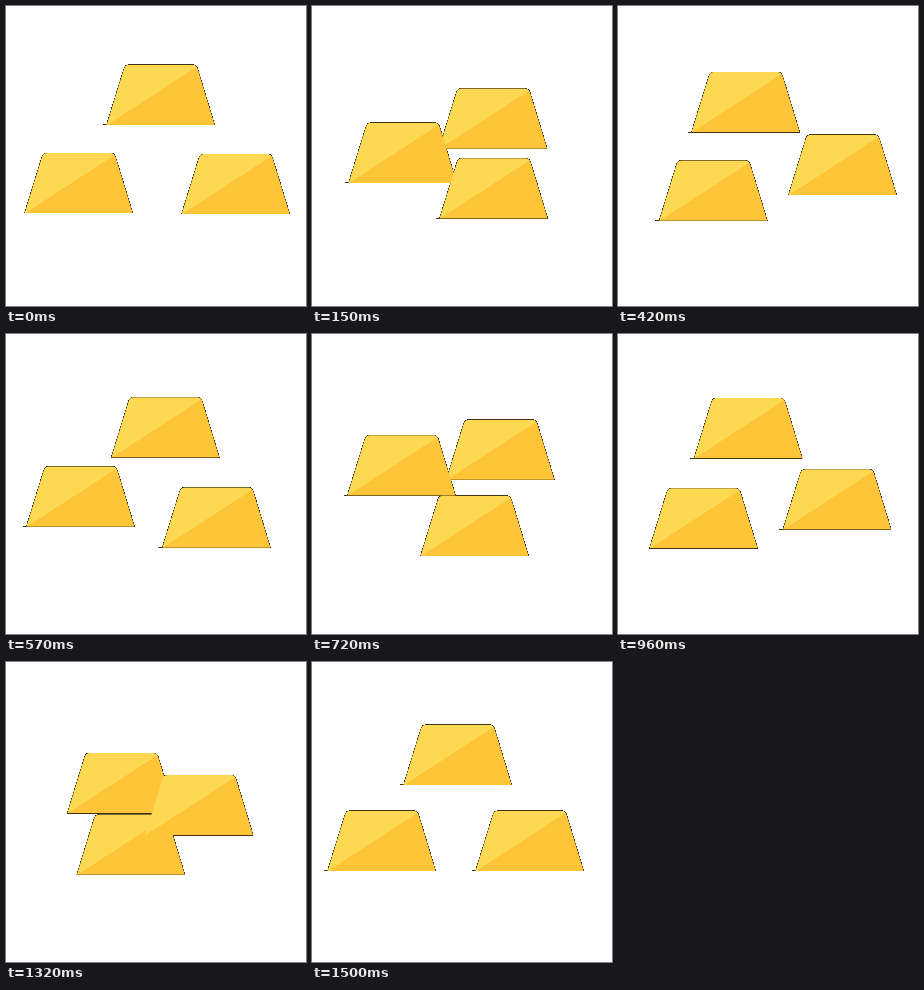
An HTML page for the animation above (1650 ms loop, 300 by 300 pixels).

```html
<!DOCTYPE html>
<html lang="en">
<head>
<meta charset="utf-8">
<title>Gold bars</title>
<style>
  html, body { margin: 0; width: 100%; height: 100%; overflow: hidden; background: #fff; }
  svg { display: block; width: 100%; height: 100%; }
</style>
</head>
<body>
<svg viewBox="0 0 300 300" xmlns="http://www.w3.org/2000/svg">
  <defs>
    <linearGradient id="gold" gradientUnits="userSpaceOnUse" x1="18.75" y1="-73.75" x2="76.75" y2="15.75">
      <stop offset=".5" stop-color="#fdd853"/>
      <stop offset=".5" stop-color="#ffc538"/>
    </linearGradient>
    <!-- Half-covered edge pixels are backed with black, which gives the thin uneven outline -->
    <filter id="rim" filterUnits="userSpaceOnUse" x="0" y="0" width="300" height="300" color-interpolation-filters="sRGB">
      <feColorMatrix values="0 0 0 0 0  0 0 0 0 0  0 0 0 0 0  0 0 0 40 -2"/>
      <feMerge>
        <feMergeNode/>
        <feMergeNode in="SourceGraphic"/>
      </feMerge>
    </filter>
    <path id="bar" fill="url(#gold)" d="M-1 0V-.15H2.6L19.9 -56.2Q21.2 -60.2 24.7 -60.2H88.8Q92.3 -60.2 93.6 -56.2L110.7 0Z"/>
  </defs>
  <g filter="url(#rim)">
    <use href="#bar"/>
    <use href="#bar"/>
    <use href="#bar"/>
  </g>
</svg>
<script>
const LOOP = 1650, MOVE = 1500, STEP = 30, LEG = MOVE / 3;
const BULGE = 13.5;

// The triangle drifts a little: its top, right and left corner at the start of each leg
const corners = [
  [[98, 119], [173, 208.1], [16, 207.1]],
  [[87, 115], [176, 207], [13, 209]],
  [[82, 119.3], [166, 205], [16, 211]],
  [[89, 123], [161, 209], [13, 209]]
];
const firstCorner = [0, 2, 1]; // back to front
const bars = document.querySelectorAll("use");

// Each bar goes clockwise to the next corner; its path bows outward, most at half time
function position(first, t) {
  const leg = Math.min(2, Math.floor(t / LEG));
  const u = t / LEG - leg, T = t / MOVE;
  const [ax, ay] = corners[leg][(first + leg) % 3];
  const [bx, by] = corners[leg + 1][(first + leg + 1) % 3];
  const dx = bx - ax, dy = by - ay;
  const bow = BULGE * 4 * T * (1 - T) * 4 * u * (1 - u) / Math.hypot(dx, dy);
  return [ax + dx * u + dy * bow, ay + dy * u - dx * bow];
}

function draw(ms) {
  const t = Math.min(MOVE, Math.floor((ms % LOOP) / STEP) * STEP);
  bars.forEach((bar, i) => {
    const [x, y] = position(firstCorner[i], t);
    bar.setAttribute("transform", `translate(${x.toFixed(2)} ${y.toFixed(2)})`);
  });
}

const start = performance.now();
function tick() {
  draw(performance.now() - start);
  requestAnimationFrame(tick);
}
tick();
</script>
</body>
</html>
```
